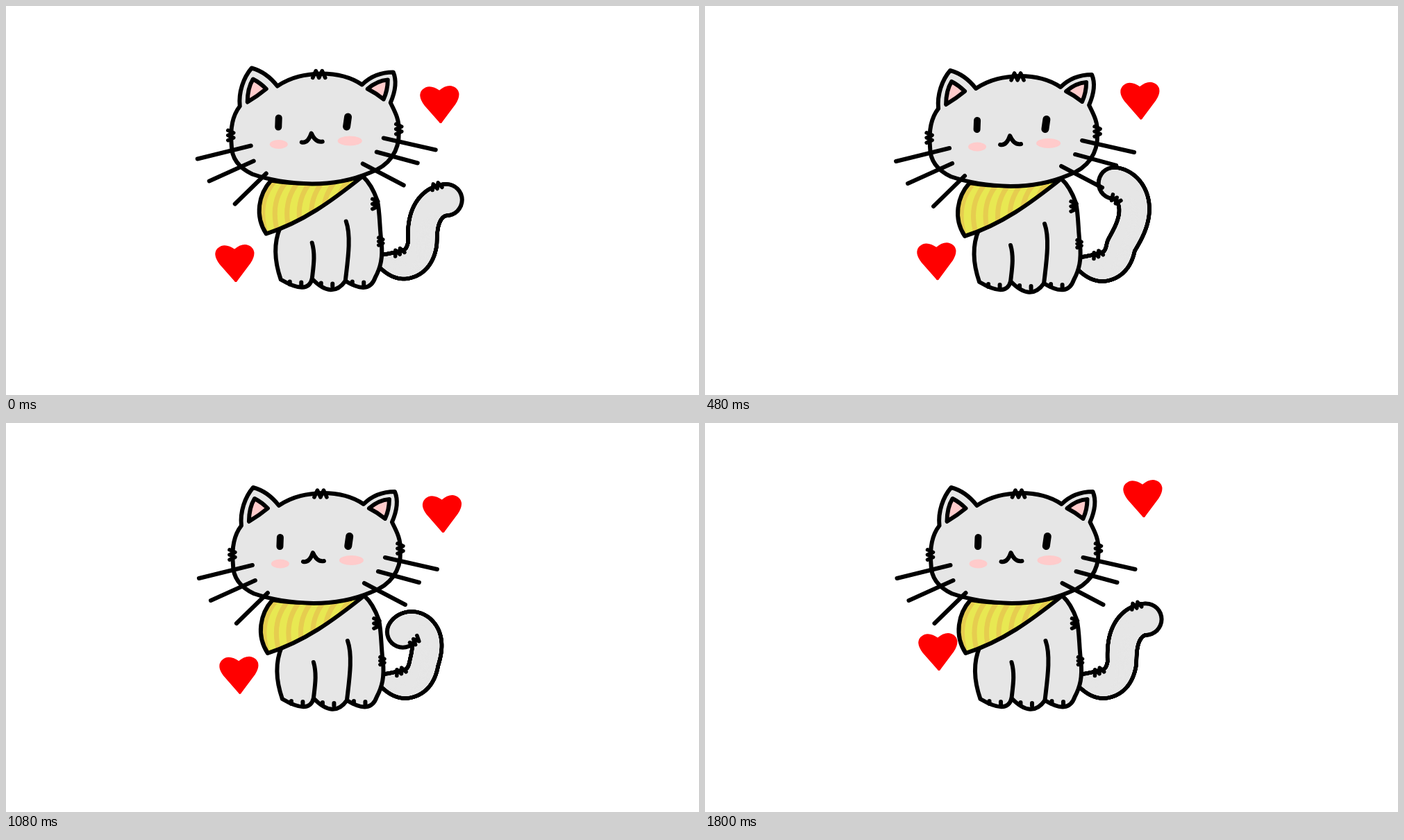
Animation of 998x561 px, one loop 1920 ms. Source, as an HTML page with a canvas:

```html
<!DOCTYPE html>
<html lang="en">
<head>
<meta charset="utf-8">
<title>Cat with a wagging tail</title>
<style>
  html, body { margin: 0; width: 100%; height: 100%; overflow: hidden; background: #fff; }
  canvas { display: block; width: 100%; height: 100%; }
</style>
</head>
<body>
<canvas id="stage" width="998" height="561"></canvas>
<script>
const ctx = document.getElementById('stage').getContext('2d');
const FUR = '#e6e6e6', PINK = '#ffcbcb', INK = '#000';
const TAU = Math.PI * 2, DEG = Math.PI / 180;

// The picture advances in 16 steps: a quick start and two long holds
const DELAYS = Array(16).fill(120);
DELAYS[0] = DELAYS[1] = 60;
DELAYS[7] = DELAYS[8] = 180;
const LOOP = DELAYS.reduce((sum, d) => sum + d);
const LAST = DELAYS.length - 1;

// Tail poses from stretched right to curled left; angles in degrees
const POSES = [
  { from: -45, to: 35, length: 82, tuft: 0.1 },
  { from: -90, to: 0, length: 80, tuft: 0.9 },
  { from: -83, to: -47, length: 105, tuft: 0.75 },
  { from: -60, to: -175, length: 109, tuft: 0.85 },
  { from: -80, to: -218, length: 98, tuft: 0.8 },
  { from: -75, to: -240, length: 79, tuft: 0.95 }
];

const HEAD = new Path2D(`M339 147 C337 127 344 106 356 92 C371 96 383 105 393 118
  C414 104 434 101 456 100 C479 100 499 105 515 116 C528 103 542 98 560 98
  C566 112 562 128 556 142 C563 156 569 167 568 184 C569 212 554 233 526 243
  C500 254 472 259 443 259 C409 258 380 253 357 245 C338 236 327 222 327 203
  C325 181 328 161 339 147 Z`);
const EARS = new Path2D(`M358 108 Q368 113 377 122 Q365 132 350 141 Q350 121 358 108 Z
  M523 122 Q537 110 552 109 Q552 124 546 137 Q535 128 523 122 Z`);
const BODY = new Path2D(`M397 322 C387 346 389 371 398 397 Q437 420 443 396
  Q472 426 491 399 Q525 420 534 394 C542 379 545 365 543 344
  C540 321 541 301 537 283 Q529 260 516 248 L420 250 Z`);
const LEGS = new Path2D('M443 344 C448 361 445 378 443 396 M492 313 C500 335 494 372 491 399');
const SCARF = new Path2D('M384 254 C366 274 360 305 377 331 C430 314 471 284 516 248 Q450 265 384 254 Z');
const WHISKERS = new Path2D(`M278 223 L355 204 M295 255 L359 226 M332 288 L377 244
  M546 193 L621 210 M536 213 L595 229 M516 230 L575 261`);
const MOUTH = new Path2D('M428 199 Q437 201 442 186 Q448 200 458 198');
const HALF_HEART = new Path2D('M0 -2 L21 -28 Q30 -41 23 -48 Q14 -56 0 -45 Z');

const mix = (a, b, k) => a + (b - a) * k;

function ink(path, width = 6, color = INK) {
  ctx.strokeStyle = color;
  ctx.lineWidth = width;
  ctx.stroke(path);
}

function paint(path, color) {
  ctx.fillStyle = color;
  ctx.fill(path);
}

function shape(path, color) {
  paint(path, color);
  ink(path);
}

function blob(x, y, rx, ry, color) {
  ctx.beginPath();
  ctx.ellipse(x, y, rx, ry, 0, 0, TAU);
  ctx.fillStyle = color;
  ctx.fill();
}

function line(x, y, dx, dy, width) {
  const path = new Path2D();
  path.moveTo(x, y);
  path.lineTo(x + dx, y + dy);
  ink(path, width);
}

// Scribbled tuft of fur centred on a point
function tuft(x, y, angle, size = 0.8) {
  const path = new Path2D();
  for (let k = -2; k <= 2; k++) path.lineTo(k * 4.5, k % 2 ? -5 : 5);
  ctx.save();
  ctx.translate(x, y);
  ctx.rotate(angle);
  ctx.scale(size, size);
  ink(path, 5.5 / size);
  ctx.restore();
}

// Wag left, sweep right, return to the start
function swingAt(step) {
  if (step <= 9) return Math.max(0, (step - 1) / 2);
  if (step <= 13) return 4 - (step - 9) * 1.25;
  return (step - LAST) / 2;
}

function poseAt(swing) {
  const at = swing + 1;
  const i = Math.min(Math.floor(at), POSES.length - 2);
  const pose = {};
  for (const key in POSES[i]) pose[key] = mix(POSES[i][key], POSES[i + 1][key], at - i);
  return pose;
}

// Centre line: a fixed bend at the root, then a curl that tightens toward the tip
function tailSpine({ from, to, length }) {
  const spine = [];
  const steps = 80;
  for (let i = 0; i < steps; i++) {
    const k = i / steps;
    spine.push({
      x: mix(mix(546, 595, k), mix(595, 602, k), k),
      y: mix(mix(371, 388, k), mix(388, 345, k), k),
      r: 10 + 10.5 * Math.sin(Math.min(1, k * 2.5) * TAU / 4)
    });
  }
  let x = 602, y = 345;
  for (let i = 0; i <= steps; i++) {
    const k = i / steps;
    const angle = mix(from, to, k * k) * DEG;
    spine.push({ x, y, angle, r: 20.5 + 2 * k });
    x += Math.cos(angle) * length / steps;
    y += Math.sin(angle) * length / steps;
  }
  return spine;
}

function drawTail(pose) {
  const spine = tailSpine(pose);
  for (const p of spine) blob(p.x, p.y, p.r + 3, p.r + 3, INK);
  for (const p of spine) blob(p.x, p.y, p.r - 3, p.r - 3, FUR);
  const p = spine[80 + Math.round(pose.tuft * 80)];
  tuft(p.x + Math.sin(p.angle) * p.r, p.y - Math.cos(p.angle) * p.r, p.angle);
  tuft(568, 357, -0.4);
}

function drawBody() {
  shape(BODY, FUR);
  ink(LEGS);
  for (let paw = 0; paw < 3; paw++) {
    const x = 411 + paw * 45, y = 400 + (paw % 2) * 2;
    line(x, y, 0, 4);
    line(x + 16.5, y + 1, 0, 4);
  }
}

function drawScarf() {
  paint(SCARF, '#e8e852');
  ctx.save();
  ctx.clip(SCARF);
  for (let x = 372; x < 490; x += 17.5) {
    ink(new Path2D(`M${x + 22} 250 C${x} 272 ${x - 6} 300 ${x + 6} 335`), 7, '#e6cd4f');
  }
  ctx.restore();
  ink(SCARF);
}

function drawHead() {
  shape(HEAD, FUR);
  shape(EARS, PINK);
  blob(395, 202, 13, 6.5, PINK);
  blob(497.5, 197, 17.5, 7, PINK);
  line(395, 164, -0.5, 13, 10);
  line(494.8, 162.5, -2, 14, 11);
  ink(MOUTH);
  ink(WHISKERS);
}

function drawHeart(x, y) {
  ctx.save();
  ctx.translate(x, y);
  ctx.rotate(-0.04);
  for (const side of [-1, 1]) {
    ctx.save();
    ctx.scale(side, 1);
    paint(HALF_HEART, '#f00');
    ink(HALF_HEART, 4, '#f00');
    ctx.restore();
  }
  ctx.restore();
}

function draw(step) {
  const u = step / LAST;
  ctx.fillStyle = '#fff';
  ctx.fillRect(0, 0, 998, 561);
  ctx.lineCap = ctx.lineJoin = 'round';

  // The whole cat drifts by a few pixels
  ctx.save();
  ctx.translate(-1.5 - 2 * Math.sin((step + 1) / 16 * TAU), 1 - 3.5 * Math.exp(-step));
  drawTail(poseAt(swingAt(step)));
  drawBody();
  drawScarf();
  drawHead();
  tuft(453, 101, 0, 1);
  tuft(326, 189, TAU / 4);
  tuft(568, 180, TAU / 4);
  tuft(534, 288, TAU / 4);
  tuft(542, 342, TAU / 4, 0.6);
  ctx.restore();

  // Hearts rise slowly, then hurry at the end
  drawHeart(626 + 6 * u, 169 - 16 * u - 17 * u ** 5);
  drawHeart(331 + 6 * Math.min(1, u * 2), 398 - 8 * u - 33 * u ** 5);
}

function stepAt(time) {
  let step = 0;
  while (time >= DELAYS[step]) time -= DELAYS[step++];
  return step;
}

const start = performance.now();
function frame() {
  draw(stepAt((performance.now() - start) % LOOP));
  requestAnimationFrame(frame);
}
frame();
</script>
</body>
</html>
```
